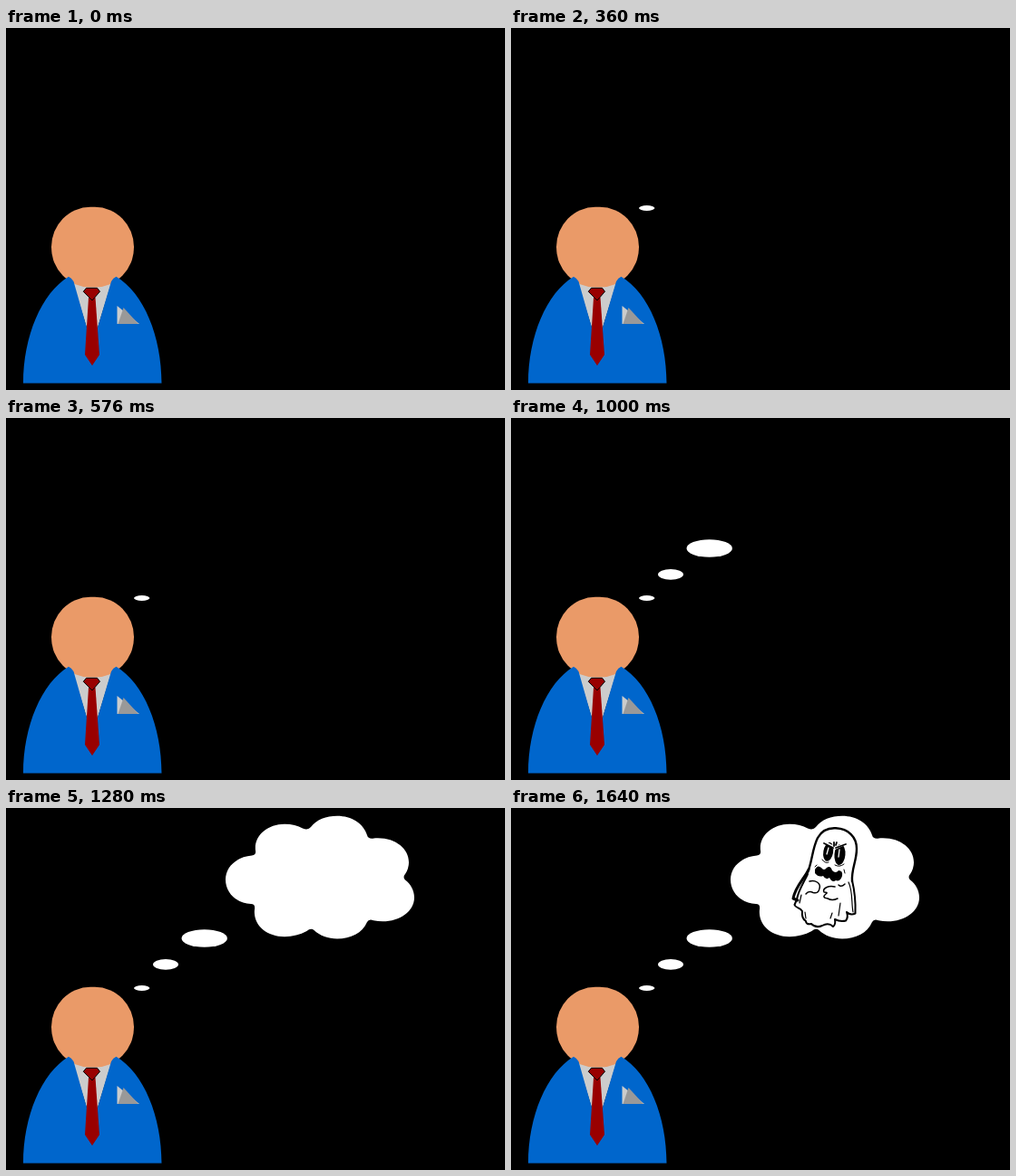
Write an HTML page that moves like this. It is 550 px wide and 400 px high and loops after 2 s.

```html
<!DOCTYPE html>
<html lang="en">
<head>
<meta charset="utf-8">
<title>Worried thought</title>
<style>
  html, body { margin: 0; width: 100%; height: 100%; overflow: hidden; background: #000; }
  svg { display: block; width: 550px; height: 400px; }
  [data-from] { visibility: hidden; }
</style>
</head>
<body>
<svg viewBox="0 0 550 400">
  <g id="man">
    <path fill="#ccc" d="M73 279H117L101 331H89Z"/>
    <rect x="50" y="197.8" width="91" height="88.7" rx="43" ry="44" fill="#ea9a68"/>
    <path fill="#06c" d="M19 392.6C19 341 39 293 69 274.8Q72 276 74.5 280L89 331H101L116 280Q118 276 121.500 274.800C152 293 171.500 341 171.500 392.600Z"/>
    <path fill="#900" d="M91 298H98.500L103 361L95 373L87 361Z"/>
    <path fill="#900" stroke="#000" d="M88.500 287.300H100.500L103.500 291.200L95 301L85.300 291.200Z"/>
    <path fill="#ccc" d="M122.500 307L147 327H122.500Z"/>
    <path fill="#999" d="M129.500 309L146 327H123.500Z"/>
  </g>

  <g fill="#fff">
    <ellipse data-from="360" cx="149.700" cy="199" rx="8.700" ry="2.900"/>
    <ellipse data-from="720" cx="176" cy="172.800" rx="14" ry="5.900"/>
    <ellipse data-from="1000" cx="218.700" cy="144" rx="25.200" ry="9.800"/>
    <path data-from="1280" d="M271 52.500Q276 51.500 275 47C273 31 288 17.800 307 17.800Q319 17.800 327 22.500Q333 25 336 21C342 13 353 8.800 365 8.800C381 8.800 394 17 398 30Q399 34 404 33.700C427 31 444 44 444 60Q444 67 440 73Q437 76 440 79.500C446 84 450 91 450 99C450 117 428 129 405 124.200Q400 122 398 126C393 138 380 144.500 365 144.500C355 144.500 346 141 339.500 135Q336 132 331.500 136C324 140 316 142.200 307 142.200C287 142.200 272 129 274 112Q275 106 270 106C254 105 242 94 242 79C242 65 254 54 271 52.500Z"/>
  </g>

  <g data-from="1640" fill="none" stroke="#000" stroke-width="2" stroke-linecap="round" stroke-linejoin="round">
    <g id="sheet">
      <path stroke-width="2.400" d="M327 71C332 59 332 45 338 33C343 24 350 21.800 358 22.300C372 23 381 32 381 45C381 59 375 67 376 81"/>
      <path stroke-width="3" d="M328 68C324 77 313 87 311 100L316 102"/>
      <path d="M327 73C323 82 317 90 315 101L312.500 107C314 111 318 109 321 114Q320 122 325 125Q325 129 331 128Q336 133 343 130Q350 126 355 131Q358 129 357 123Q363 126 369 124.500Q372 121 370 115Q374 119 379.500 116.500C380 104 379 93 376 80"/>
      <path d="M372 82C377 92 375 105 377 115M320 96L318 105M324 115L325 122M363 105L361 119M352 122L354 116" stroke-width="1.200"/>
    </g>
    <g id="hands" stroke-width="1.500">
      <path d="M329 81C335 79 342 83 340 89Q339 95 333 93.500Q328 91 325 95M357 87C350 85 343 89 345 93Q350 93 347 95Q342 99 349 100Q354 103 360 100M368 84Q364 88 361 85"/>
    </g>
    <g id="face">
      <g fill="#000" stroke="none">
        <ellipse cx="349.800" cy="48.500" rx="5.400" ry="10.500" transform="rotate(10 350 48)"/>
        <ellipse cx="362.500" cy="51.500" rx="6" ry="11.500" transform="rotate(5 362 51)"/>
        <path d="M335 68Q338 62 342 66Q345 70 348 66Q352 63 354 69Q358 73 361 69Q366 69 365 75Q363 82 358 80Q354 83 351 77Q347 80 344 75Q339 77 335 72Z"/>
      </g>
      <path stroke="#fff" stroke-width="1.300" d="M350 44L348 51M362 46L361 54"/>
      <path stroke="#fff" stroke-width="3" d="M346 38L355 43M358 44L369 39"/>
      <path stroke-width="1.800" d="M345 39L355 44M358 44L369 40M356 38V42M359 38L358 41"/>
      <path stroke-width="1" d="M343 57Q347 62 350 60M357 63Q362 66 367 62M337 63L335 65M367 68L368 72"/>
    </g>
  </g>
</svg>
<script>
  const LOOP = 2000;
  const parts = [...document.querySelectorAll('[data-from]')];

  function draw(now) {
    const time = now % LOOP;
    for (const part of parts) {
      part.style.visibility = time >= Number(part.dataset.from) ? 'visible' : 'hidden';
    }
  }

  const start = performance.now();
  function tick() {
    draw(performance.now() - start);
    requestAnimationFrame(tick);
  }
  tick();
</script>
</body>
</html>
```
